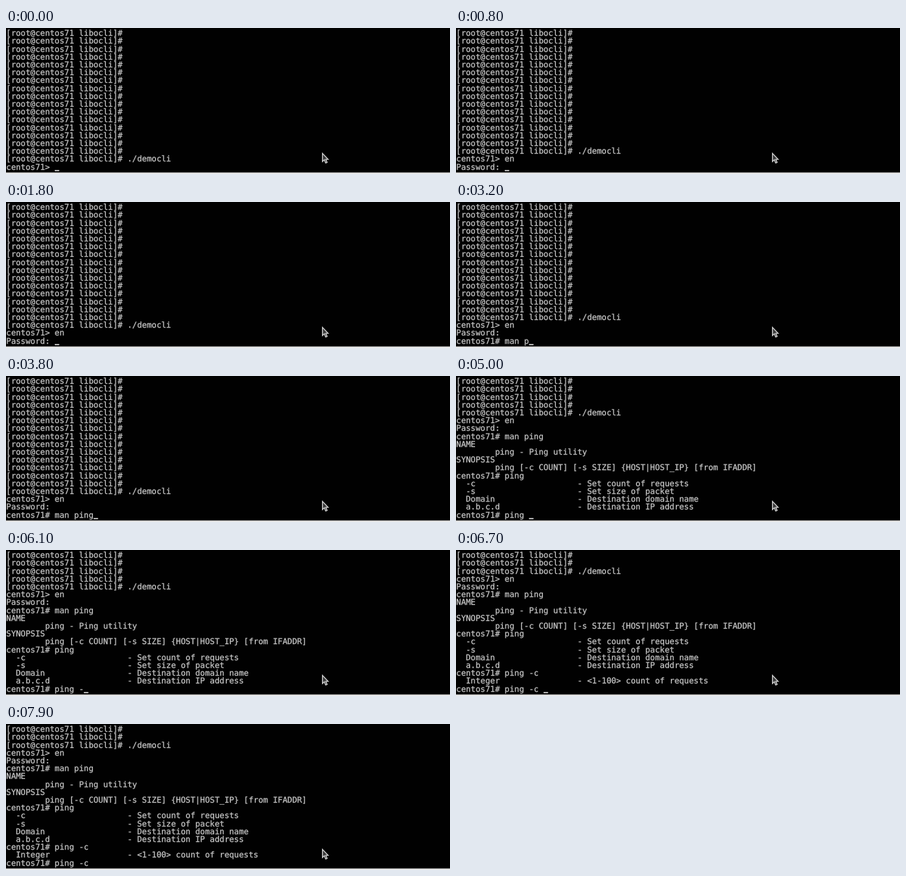
Recreate the animation shown at these times as an HTML page. Size 628 by 208 pixels, loop 8000 ms.

```html
<!DOCTYPE html>
<html lang="en">
<head>
<meta charset="utf-8">
<title>Terminal session</title>
<style>
  html, body { margin: 0; width: 100%; height: 100%; overflow: hidden; background: #000; }
  svg { display: block; }
  text {
    font: 11.4px "DejaVu Sans Mono", monospace;
    fill: #c8c8c8;
    stroke: #c8c8c8;
    stroke-width: 0.25px;
    white-space: pre;
    text-rendering: geometricPrecision;
  }
</style>
</head>
<body>
<svg id="stage" width="628" height="208" viewBox="0 0 628 208">
  <rect width="628" height="208" fill="#010101"/>
  <g id="rows"></g>
  <rect id="caret" y="202.4" width="6.4" height="1.6" fill="#d4d4d4"/>
  <rect y="205.8" width="628" height="2.2" fill="#dedede"/>
  <path d="M447.6 178.6V190.2L450.2 187.8L452.2 192.4L454.2 191.5L452.2 187.1H455.6Z"
        fill="#3a3a3a" stroke="#d2d2d2" stroke-width="1.3"/>
</svg>
<script>
const LOOP = 8000, ROWS = 18, PITCH = 11.2, LEFT = 0.3, ADVANCE = 6.863;
const shell = '[root@centos71 libocli]# ';
const user = 'centos71> ', admin = 'centos71# ';
const option = (name, help) => ('  ' + name).padEnd(25) + '- ' + help;

// Each step: time, text of the input line, lines printed above it since the previous step.
const steps = [
  [0, user, [...Array(ROWS).fill(shell), shell + './democli']],
  [600, user + 'e'],
  [700, user + 'en'],
  [800, 'Password: ', [user + 'en']],
  [2900, admin, ['Password: ']],
  [3000, admin + 'm'],
  [3100, admin + 'man'],
  [3200, admin + 'man p'],
  [3300, admin + 'man pi'],
  [3400, admin + 'man pin'],
  [3500, admin + 'man ping'],
  [3900, admin, [
    admin + 'man ping',
    'NAME',
    '        ping - Ping utility',
    'SYNOPSIS',
    '        ping [-c COUNT] [-s SIZE] {HOST|HOST_IP} [from IFADDR]'
  ]],
  [4400, admin + 'p'],
  [4500, admin + 'pi'],
  [4600, admin + 'pin'],
  [4700, admin + 'ping'],
  [4800, admin + 'ping '],
  [5000, admin + 'ping ', [
    admin + 'ping ',
    option('-c', 'Set count of requests'),
    option('-s', 'Set size of packet'),
    option('Domain', 'Destination domain name'),
    option('a.b.c.d', 'Destination IP address')
  ]],
  [6100, admin + 'ping -'],
  [6200, admin + 'ping -c'],
  [6300, admin + 'ping -c '],
  [6500, admin + 'ping -c ', [
    admin + 'ping -c ',
    option('Integer', '<1-100> count of requests')
  ]]
];

const caretOff = [[900, 1500], [2100, 2700], [5700, 6100], [7600, 8000]];

const caret = document.getElementById('caret');
const rows = Array.from({ length: ROWS }, (_, i) => {
  const row = document.createElementNS('http://www.w3.org/2000/svg', 'text');
  row.setAttribute('x', LEFT);
  row.setAttribute('y', 11.1 + i * PITCH);
  document.getElementById('rows').append(row);
  return row;
});

function render(time) {
  const t = time % LOOP;
  const past = steps.filter(([at]) => at <= t);
  const input = past.at(-1)[1];
  const screen = [...past.flatMap(([, , lines = []]) => lines), input].slice(-ROWS);
  rows.forEach((row, i) => {
    if (row.textContent !== screen[i]) row.textContent = screen[i];
  });
  const hidden = caretOff.some(([from, to]) => t >= from && t < to);
  caret.setAttribute('x', LEFT + input.length * ADVANCE);
  caret.setAttribute('visibility', hidden ? 'hidden' : 'visible');
}

const start = performance.now();
function tick() {
  render(performance.now() - start);
  requestAnimationFrame(tick);
}
tick();
</script>
</body>
</html>
```
